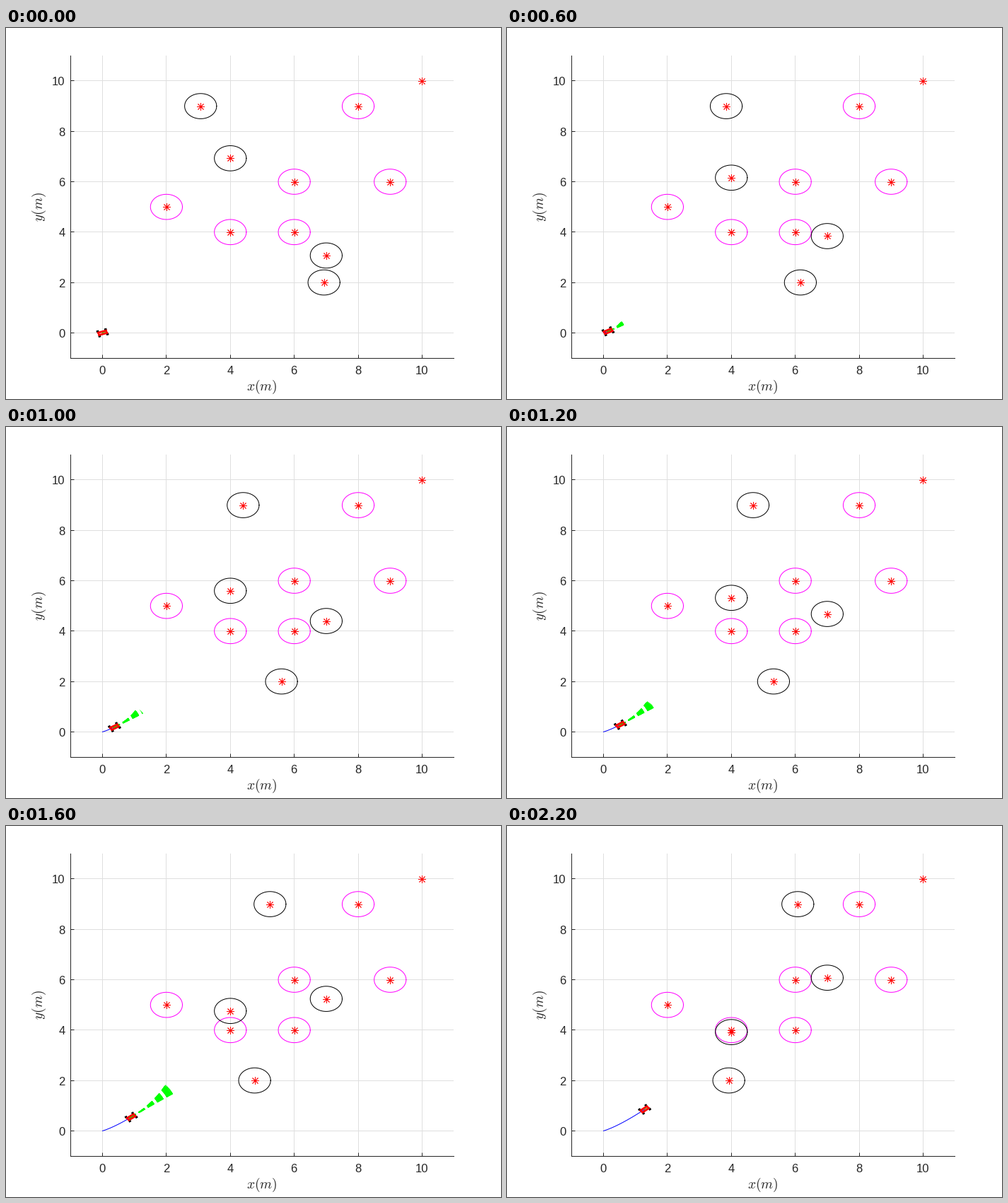
A matplotlib script that plays this animation: 700x525 px, repeating every 2300 ms.

```python
import numpy as np
import matplotlib.pyplot as plt
from matplotlib.animation import FuncAnimation
from matplotlib.collections import LineCollection
from matplotlib.patches import Arc, Circle, Rectangle, RegularPolygon
from matplotlib.transforms import Affine2D

W, H, DPI = 700, 525, 100
PX = 72 / DPI                      # one pixel in points
FRAMES, INTERVAL = 23, 100
DT, HORIZON, STOP = 0.1, 2.8, 40   # simulation step, look-ahead, last moving step
V_MAX, ACCEL = 0.62, 0.2
INK, GRID, ICON = "#262626", "#dfdfdf", "#808080"

plt.rcParams.update({
    "font.family": "Liberation Sans",
    "mathtext.fontset": "cm",
    "lines.scale_dashes": False,
})

fig = plt.figure(figsize=(W / DPI, H / DPI), dpi=DPI, facecolor="white")
LEFT, BOTTOM, AX_W, AX_H = 90.9, 58.5, 542.3, 427.7
ax = fig.add_axes([LEFT / W, BOTTOM / H, AX_W / W, AX_H / H])
ax.set(xlim=(-1, 11), ylim=(-1, 11), facecolor="white")
ax.set_axisbelow(True)
ticks = range(0, 11, 2)
ax.set_xticks(ticks, [])
ax.set_yticks(ticks, [])
ax.grid(color=GRID, lw=PX)
ax.tick_params(direction="in", length=5 * PX, width=PX, color=INK)
for side, spine in ax.spines.items():
    spine.set(visible=side in ("left", "bottom"), color=INK, lw=PX)

# Grid lines snap to pixel centres, so curves get the same half-pixel shift
shifted = ax.transData + Affine2D().translate(0.4, -0.5)

# Overlay in pixel units, origin at the top left
ui = fig.add_axes([0, 0, 1, 1])
ui.set(xlim=(0, W), ylim=(H, 0))
ui.axis("off")


def label(x, y, text, size=12, ha="center", **kw):
    ui.text(x, y, text, size=size, color=INK, ha=ha, va="center", **kw)


for t in ticks:
    label(LEFT + (t + 1) * AX_W / 12, 485, str(t))
    label(83.5, H - BOTTOM - (t + 1) * AX_H / 12 + 2.5, str(t), ha="right")
label(362.2, 508, "$x(m)$", 14)
label(47.3, 253.3, "$y(m)$", 14, rotation=90)


def curve(**style):
    return ax.plot([], [], transform=shifted, **style)[0]


# Obstacles
phi = np.linspace(0, 2 * np.pi, 101)
STAR = dict(marker=(8, 2, 0), ms=11 * PX, mew=0.85 * PX, mec="red", ls="none", zorder=6)


def ring(color):
    return curve(color=color, lw=PX, zorder=5)


def place(line, x, y):
    line.set_data(x + 0.5 * np.cos(phi), y + 0.5 * np.sin(phi))


FIXED = [(2, 5), (4, 4), (6, 4), (6, 6), (9, 6), (8, 9)]
for spot in FIXED:
    place(ring("magenta"), *spot)
curve(**STAR).set_data(*zip(*FIXED, (10, 10)))

MOVERS = np.array([(3, 9), (4, 7), (7, 3), (7, 2)])
DIRS = np.array([(1, 0), (0, -1), (0, 1), (-1, 0)])
rings = [ring("black") for _ in MOVERS]
stars = curve(**STAR)


# Vehicle motion: steady acceleration, a slow left turn, then a dead stop
def speed(k):
    return min(ACCEL * DT * k, V_MAX)


def turn(k):
    return 8 - 1.2 * DT * k


def heading(k):
    t = DT * min(k, STOP)
    return np.radians(17.6 + 8 * t - 0.6 * t * t)


def unit(a):
    return np.stack([np.cos(a), np.sin(a)], axis=-1)


moves = [DT * speed(k) * unit(heading(k - 1)) for k in range(1, STOP + 1)]
path = np.vstack([(0, 0), np.cumsum(moves, axis=0)])


def rollouts(k):
    """Paths reachable from the previous step within the dynamic window."""
    v0, t = speed(k - 1), DT * np.arange(round(HORIZON / DT))
    out = []
    for v in np.linspace(max(v0 - 0.02, 0), v0 + 0.01, 4):
        for w in np.radians(turn(k - 1) + np.arange(-5, 6)):
            steps = v * DT * unit(heading(k - 1) + w * t)
            out.append(path[k - 1] + np.vstack([(0, 0), np.cumsum(steps, axis=0)]))
    return out


trail = curve(color="blue", lw=PX, zorder=4)
fan = LineCollection([], colors="lime", linewidths=PX, zorder=7, transform=shifted,
                     linestyles=[(0, (10 * PX, 5 * PX))], capstyle="butt")
ax.add_collection(fan, autolim=False)

# Vehicle strokes in its own frame: (x0, x1), (y0, y1), line
car = []


def part(xs, ys, color, width):
    line = curve(color=color, lw=width * PX, zorder=8, solid_capstyle="butt")
    car.append((np.array(xs), np.array(ys), line))


for end in (-0.13, 0.13):
    part((end, end), (-0.09, 0.09), "red", 2.5)
    for side in (-0.1, 0.1):
        part((end - 0.04, end + 0.04), (side, side), "black", 3)
for side in (-0.05, 0.05):
    part((-0.16, 0.16), (side, side), "red", 2.8)
part((-0.02, 0.1), (0, 0), "#6f9f00", 1)

# Axes toolbar: icons 25 px apart
tools = []


def stroke(x0, y0, x1, y1, lw=1.5, color=ICON):
    tools.extend(ui.plot((x0, x1), (y0, y1), color=color, lw=lw * PX,
                         solid_capstyle="round"))


def shape(patch, filled=False):
    patch.set(ec=ICON, fc=ICON if filled else "none", lw=1.5 * PX)
    tools.append(ui.add_patch(patch))


def export_icon(x, y):
    shape(Arc((x + 3, y + 3), 15, 12, theta1=180, theta2=270))
    shape(RegularPolygon((x + 4, y - 3), 3, radius=4, orientation=np.pi / 6), True)
    stroke(x - 8, y + 7, x + 6, y + 7)
    shape(RegularPolygon((x + 8, y + 7), 3, radius=2, orientation=np.pi), True)


def brush_icon(x, y):
    stroke(x + 4, y - 8, x + 2, y - 1, 4)
    stroke(x - 4, y, x + 6, y + 2, 2.5)
    for i in range(4):
        stroke(x - 4 + 3 * i, y + 3, x - 6 + 3 * i, y + 7 + i / 2, 2)


def tip_icon(x, y):
    shape(Rectangle((x - 7, y - 8), 15, 16))
    stroke(x - 9, y, x - 7, y)
    for dy in (-3, 2):
        stroke(x - 3, y + dy, x + 4, y + dy)


def hand_icon(x, y):
    for width, color in ((5, ICON), (2.2, "white")):
        for i in range(4):
            dx = 3.4 * i - 4
            stroke(x + dx, y - 7 + (i - 1.3) ** 2, x + dx, y + 3, width, color)
        stroke(x - 7, y + 1, x - 1, y + 6, width, color)
        stroke(x - 1, y + 5, x + 4, y + 5, width + 2, color)


def zoom_icon(x, y, plus=True):
    shape(Circle((x - 1.5, y - 2), 7))
    stroke(x + 4, y + 3.5, x + 9, y + 8.5, 2.4)
    stroke(x - 4.5, y - 2, x + 1.5, y - 2)
    if plus:
        stroke(x - 1.5, y - 5, x - 1.5, y + 1)


def zoom_out_icon(x, y):
    zoom_icon(x, y, plus=False)


def home_icon(x, y):
    for s in (-1, 1):
        stroke(x, y - 9, x + 9 * s, y)
        stroke(x + 7 * s, y, x + 7 * s, y + 8)
        stroke(x + 2.5 * s, y + 2, x + 2.5 * s, y + 8)
        stroke(x + 2.5 * s, y + 8, x + 7 * s, y + 8)
    stroke(x - 2.5, y + 2, x + 2.5, y + 2)


for i, icon in enumerate([export_icon, brush_icon, tip_icon, hand_icon,
                          zoom_icon, zoom_out_icon, home_icon]):
    icon(471.5 + 25 * i, 26)


def draw(n):
    k = max(1, 2 * n)
    spots = MOVERS + 0.7 * DT * k * DIRS
    for line, spot in zip(rings, spots):
        place(line, *spot)
    stars.set_data(*spots.T)

    here = min(k, STOP)
    trail.set_data(*path[:here + 1].T)
    fan.set_segments(rollouts(k) if k <= STOP else [])

    x, y = path[here]
    c, s = unit(heading(k))
    for u, v, line in car:
        line.set_data(x + c * u - s * v, y + s * u + c * v)

    for art in tools:
        art.set_visible(n in (19, 20))
    return []


anim = FuncAnimation(fig, draw, frames=FRAMES, interval=INTERVAL,
                     init_func=lambda: draw(0), repeat=True, repeat_delay=0, blit=False)
plt.show()
```
